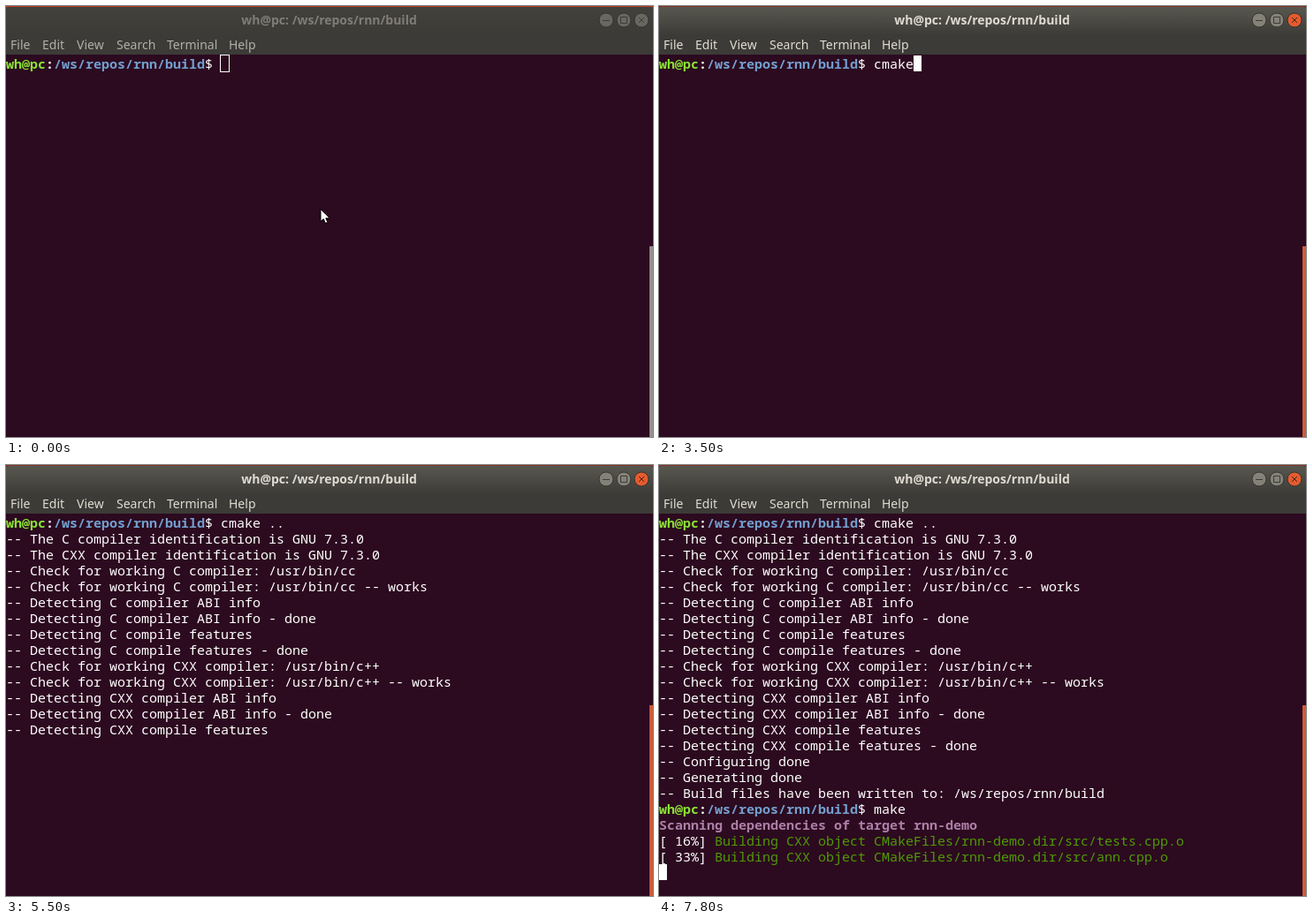
These frames come from a looping animation (732 px wide and 488 px high, 8 s). An HTML page with a canvas:

```html
<!DOCTYPE html>
<html lang="en">
<head>
<meta charset="utf-8">
<title>Terminal</title>
<style>
  html, body { margin: 0; width: 100%; height: 100%; overflow: hidden; background: #2c0a1f; }
  canvas { display: block; }
</style>
</head>
<body>
<canvas id="stage" width="732" height="488"></canvas>
<script>
const ctx = document.getElementById("stage").getContext("2d");
const LOOP = 8000, CELL_W = 9, ROW_H = 18, TOP = 56;
const MONO = '15px "Noto Sans Mono", monospace';
const SANS = '14px "Noto Sans", sans-serif';
const WHITE = "#ffffff", GREEN = "#8ae234", BLUE = "#729fcf", PLUM = "#ad7fa8", LEAF = "#4e9a06";

const USER = "wh@pc", DIR = "/ws/repos/rnn/build";
const PROMPT_COLS = USER.length + DIR.length + 3;

const checks = (lang, bin) => [
  `Check for working ${lang} compiler: ${bin}`,
  `Check for working ${lang} compiler: ${bin} -- works`,
  `Detecting ${lang} compiler ABI info`,
  `Detecting ${lang} compiler ABI info - done`,
  `Detecting ${lang} compile features`,
  `Detecting ${lang} compile features - done`
];
const configureLog = [
  "The C compiler identification is GNU 7.3.0",
  "The CXX compiler identification is GNU 7.3.0",
  ...checks("C", "/usr/bin/cc"),
  ...checks("CXX", "/usr/bin/c++"),
  "Configuring done",
  "Generating done",
  "Build files have been written to: " + DIR
];

// Each row is a list of [text, colour, bold] runs.
const prompt = cmd => [[USER, GREEN, true], [":", WHITE, true], [DIR, BLUE, true], ["$ " + cmd, WHITE]];
const building = (percent, file) => [
  [`[ ${percent}%] `, WHITE],
  [`Building CXX object CMakeFiles/rnn-demo.dir/src/${file}.cpp.o`, LEAF]
];

// Timelines: [start in ms, value]; each value holds until the next one.
const rowCount = [[0, 1], [4400, 2], [4500, 3], [4600, 4], [4700, 6], [4800, 8], [5000, 10],
  [5100, 13], [5500, 14], [5600, 19], [6600, 21], [7500, 22]];
const firstCommand = [[0, ""], [3000, "c"], [3100, "cm"], [3300, "cma"], [3500, "cmake"],
  [3600, "cmake ."], [3700, "cmake .."]];
const secondCommand = [[0, ""], [6100, "m"], [6300, "ma"], [6400, "make"]];
const running = [[0, false], [4300, true], [5600, false], [6500, true]];
const caretShown = [[0, true], [1300, false], [2000, true], [5000, false], [5600, true],
  [7200, false], [7800, true]];
const focusLevel = [[0, 0], [700, 0.5], [800, 1]];
const pointer = [[0, null], [100, [357, 228]], [300, [357, 222]], [400, [357, 216]],
  [500, [357, 212]], [700, [356, 204]], [800, [356, 199]], [1000, [354, 199]],
  [2000, [353, 199]], [2900, null]];

function at(timeline, t) {
  let value = timeline[0][1];
  for (const [start, next] of timeline) if (t >= start) value = next;
  return value;
}

function blend(a, b, k) {
  return "rgb(" + a.map((v, i) => Math.round(v + (b[i] - v) * k)) + ")";
}

function rect(x, y, w, h, color) {
  ctx.fillStyle = color;
  ctx.fillRect(x, y, w, h);
}

function label(text, x, y, font, color) {
  ctx.font = font;
  ctx.fillStyle = color;
  ctx.fillText(text, x, y);
}

function drawButton(x, kind, fill, ink) {
  ctx.beginPath();
  ctx.arc(x, 16, 8, 0, Math.PI * 2);
  ctx.fillStyle = fill;
  ctx.fill();
  ctx.strokeStyle = "#353430";
  ctx.lineWidth = 1;
  ctx.stroke();
  ctx.strokeStyle = ink;
  ctx.beginPath();
  if (kind === "min") {
    ctx.moveTo(x - 4, 16.5);
    ctx.lineTo(x + 4, 16.5);
  } else if (kind === "max") {
    ctx.rect(x - 3.5, 12.5, 7, 7);
  } else {
    ctx.moveTo(x - 3, 13);
    ctx.lineTo(x + 3, 19);
    ctx.moveTo(x + 3, 13);
    ctx.lineTo(x - 3, 19);
  }
  ctx.stroke();
}

function drawChrome(focus) {
  const bar = ctx.createLinearGradient(0, 1, 0, 33);
  bar.addColorStop(0, blend([66, 65, 60], [88, 87, 79], focus));
  bar.addColorStop(1, "#3c3b37");
  rect(0, 0, 732, 55, "#3c3b37");
  rect(0, 1, 732, 32, bar);
  rect(0, 0, 732, 1, blend([184, 62, 38], [130, 52, 38], focus));
  rect(0, 1, 2, 1, "#7c3527");
  rect(730, 1, 2, 1, "#7c3527");

  ctx.textAlign = "center";
  label(`${USER}: ${DIR}`, 365.5, 21, "bold " + SANS, blend([128, 125, 120], [223, 219, 210], focus));
  ctx.textAlign = "left";

  const menuColor = blend([178, 175, 168], [223, 219, 210], focus);
  const menu = { File: 5, Edit: 41, View: 80, Search: 125, Terminal: 182, Help: 252 };
  for (const name in menu) label(name, menu[name], 49, SANS, menuColor);

  const plain = blend([104, 103, 97], [132, 130, 120], focus);
  const close = blend([104, 103, 97], [228, 91, 47], focus);
  drawButton(679, "min", plain, "#3c3b37");
  drawButton(699, "max", plain, "#3c3b37");
  drawButton(719, "close", close, blend([60, 59, 55], [75, 35, 20], focus));

  rect(728, 272, 4, 216, blend([146, 146, 143], [205, 92, 56], focus));
}

function drawRow(runs, row) {
  let col = 0;
  for (const [text, color, bold] of runs) {
    label(text, col * CELL_W, TOP + row * ROW_H + 15, (bold ? "bold " : "") + MONO, color);
    col += text.length;
  }
}

function drawCaret(col, row, focus) {
  const x = col * CELL_W, y = TOP + row * ROW_H;
  if (focus) return rect(x, y, CELL_W, ROW_H, WHITE);
  ctx.strokeStyle = WHITE;
  ctx.lineWidth = 1;
  ctx.strokeRect(x - 0.5, y - 0.5, CELL_W + 1, ROW_H + 1);
}

function drawArrow(x, y) {
  ctx.beginPath();
  [[0, 0], [0, 14], [3.2, 11], [5.4, 16], [8, 15], [5.8, 10.3], [10, 10]]
    .forEach(([dx, dy]) => ctx.lineTo(x + dx, y + dy));
  ctx.closePath();
  ctx.fillStyle = WHITE;
  ctx.fill();
  ctx.strokeStyle = "#000";
  ctx.lineWidth = 1;
  ctx.stroke();
}

function drawBeam(x, y) {
  rect(x - 3, y - 8, 7, 3, "#000");
  rect(x - 3, y + 6, 7, 3, "#000");
  rect(x - 1, y - 6, 3, 13, "#000");
  rect(x - 2, y - 7, 5, 1, WHITE);
  rect(x - 2, y + 7, 5, 1, WHITE);
  rect(x, y - 7, 1, 15, WHITE);
}

function draw(t) {
  const focus = at(focusLevel, t), count = at(rowCount, t);
  const first = at(firstCommand, t), second = at(secondCommand, t);
  const rows = [
    prompt(first),
    ...configureLog.map(text => [["-- " + text, WHITE]]),
    prompt(second),
    [["Scanning dependencies of target rnn-demo", PLUM, true]],
    building(16, "tests"),
    building(33, "ann")
  ];

  rect(0, 0, 732, 488, "#2c0a1f");
  drawChrome(focus);
  rows.slice(0, count).forEach(drawRow);

  if (at(caretShown, t)) {
    const typed = count > 1 ? second : first;
    if (at(running, t)) drawCaret(0, count, focus);
    else drawCaret(PROMPT_COLS + typed.length, count - 1, focus);
  }

  const beam = at(pointer, t);
  if (beam) drawBeam(...beam);
  else if (t < 100) drawArrow(356, 230);
}

const start = performance.now();
function tick() {
  draw((performance.now() - start) % LOOP);
  requestAnimationFrame(tick);
}
tick();
</script>
</body>
</html>
```
